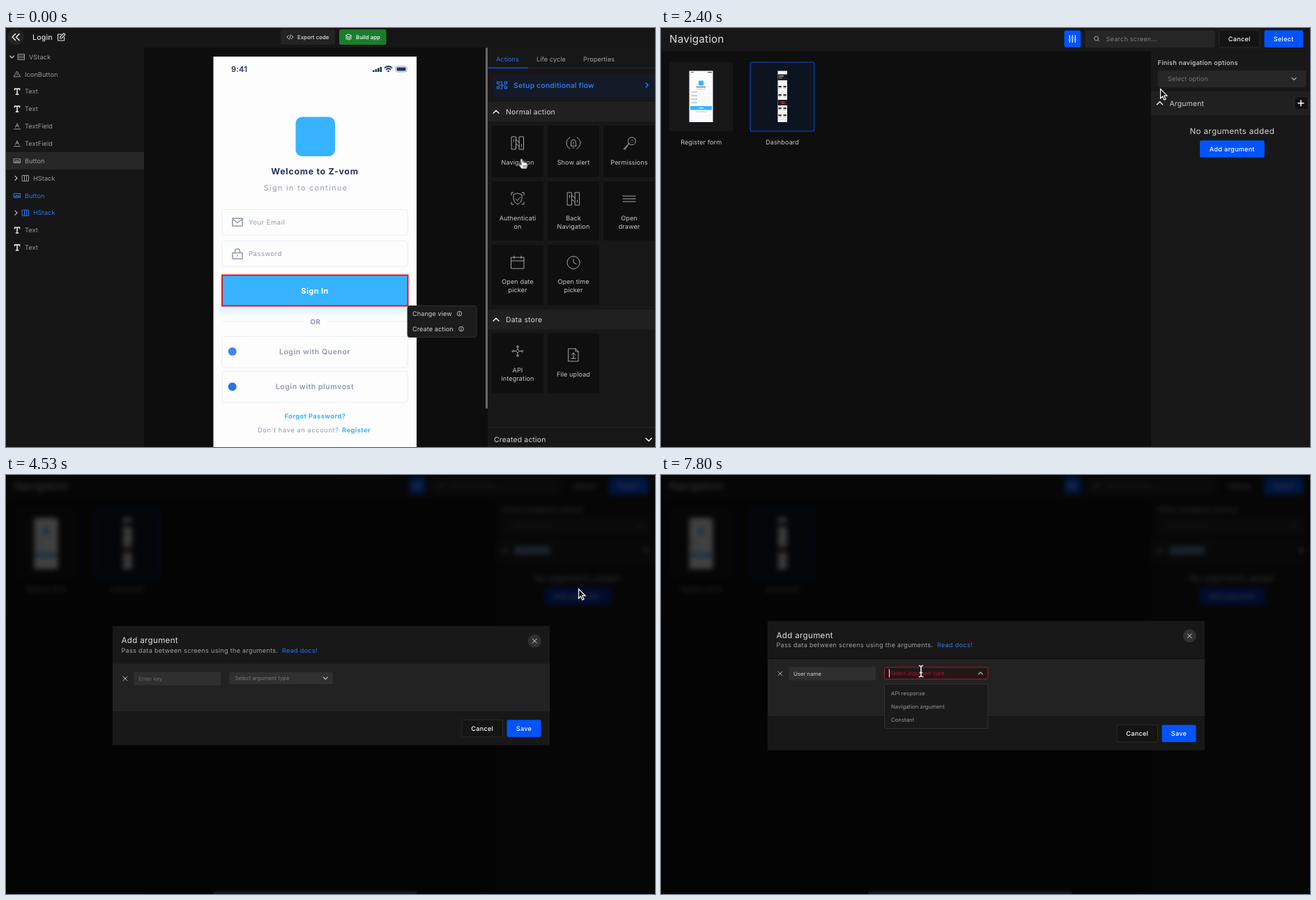
These frames come from a looping animation (931x601 px, 8 s). An HTML page:

```html
<!DOCTYPE html>
<html lang="en">
<head>
<meta charset="utf-8">
<title>Navigation action</title>
<style>
html,body{margin:0;width:100%;height:100%;overflow:hidden;background:#0d0d0d}
svg{display:block;width:931px;height:601px}
text{font-family:Inter,sans-serif;white-space:pre;text-rendering:geometricPrecision}
.line{fill:none;stroke-linecap:round;stroke-linejoin:round}

/* 8 s loop: 1% = 80 ms. Elements with .s start hidden and switch hard. */
.s{opacity:0;animation:8s step-end infinite}
#nav{opacity:0;animation:8s step-end infinite nav,8s linear infinite blur}
#regOn{animation-name:regOn}
#dashOn{animation-name:dashOn}
#searchOn{animation-name:searchOn}
#searchCaret{animation-name:searchCaret}
#mark{animation-name:mark}
#addHover{animation-name:addHover}
#dim{opacity:0;animation:8s linear infinite dim}
#dialog{opacity:0;transform-origin:466px 302px;animation:8s linear infinite dialog}
#top{animation:8s step-end infinite up}
#bottom{animation:8s step-end infinite down}
#keyOn{animation-name:keyOn}
#invalid{animation-name:invalid}
#menu,#arrowUp{animation-name:menu}
#arrowDown{opacity:1;animation:8s step-end infinite arrowDown}
#cursor{animation:8s ease-in-out infinite move}
#arrow{animation-name:arrow}
#hand{animation-name:hand}
#beam{animation-name:beam}

@keyframes nav{.875%{opacity:1}}
@keyframes blur{0%,53.375%{filter:none}56.625%,100%{filter:blur(3.5px)}}
@keyframes regOn{0%{opacity:1}17.5%{opacity:0}}
@keyframes dashOn{15.875%{opacity:1}}
@keyframes searchOn{0%{opacity:1}15.875%{opacity:0}}
@keyframes searchCaret{0%{opacity:1}7.125%{opacity:0}13.375%{opacity:1}15.875%{opacity:0}}
@keyframes mark{35%{opacity:1}}
@keyframes addHover{48.375%{opacity:1}}
@keyframes dim{0%,53.375%{opacity:0}56.625%,100%{opacity:1}}
@keyframes dialog{0%,53.375%{opacity:0;transform:scale(.95)}56.625%,100%{opacity:1;transform:none}}
@keyframes up{72.5%{transform:translateY(-7.2px)}}
@keyframes down{72.5%{transform:translateY(7.3px)}}
@keyframes keyOn{65.875%{opacity:1}95.875%{opacity:0}}
@keyframes invalid{72.5%{opacity:1}}
@keyframes menu{95.875%{opacity:1}}
@keyframes arrowDown{95.875%{opacity:0}}
@keyframes arrow{.875%{opacity:1}15%{opacity:0}21%{opacity:1}48.375%{opacity:0}54.2%{opacity:1}64.5%{opacity:0}}
@keyframes hand{0%{opacity:1}.875%{opacity:0}15%{opacity:1}21%{opacity:0}48.375%{opacity:1}54.2%{opacity:0}}
@keyframes beam{64.5%{opacity:1}72.5%{opacity:0}92.5%{opacity:1}}
@keyframes move{
  0%,6.2%{transform:translate(739.5px,187.5px)}
  15.875%,19.2%{transform:translate(205px,99.5px)}
  30%,30.5%{transform:translate(716px,87px)}
  38.4%,42%{transform:translate(783px,110px)}
  50%,57%{transform:translate(821px,163px)}
  65.5%,72.5%{transform:translate(291px,294px)}
  72.6%,92%{transform:translate(340px,285px)}
  95.3%,100%{transform:translate(373px,281.5px)}
}
</style>
</head>
<body>
<svg id="stage" viewBox="0 0 931 601" xmlns="http://www.w3.org/2000/svg"></svg>
<script>
const text = (x, y, str, fill = '#b4b4b4', o = {}) =>
  `<text x="${x}" y="${y}" fill="${fill}" font-size="${o.size || 9.05}" font-weight="${o.weight || 400}"` +
  ` letter-spacing="${o.gap ?? .12}" text-anchor="${o.mid ? 'middle' : 'start'}">${str}</text>`;
const mid = (x, y, str, fill, o) => text(x, y, str, fill, { ...o, mid: 1 });
const box = (x, y, x2, y2, fill, r = 0, stroke = 'none', w = 1) =>
  `<rect x="${x}" y="${y}" width="${x2 - x}" height="${y2 - y}" rx="${r}" fill="${fill}" stroke="${stroke}" stroke-width="${w}"/>`;
const dot = (x, y, r, fill, stroke = 'none') =>
  `<circle cx="${x}" cy="${y}" r="${r}" fill="${fill}" stroke="${stroke}"/>`;
const line = (d, color, w = 1, x = 0, y = 0) =>
  `<path class="line" d="${d}" stroke="${color}" stroke-width="${w}" transform="translate(${x} ${y})"/>`;
const group = (id, body, cls = '') => `<g id="${id}" class="${cls}">${body}</g>`;

const BLUE = '#0054ff', LINK = '#2f74f5', SKY = '#37b3ff', NAVY = '#223263', SLATE = '#9098b1';
const DOWN = 'M-3-1.5L0 1.5L3-1.5', UP = 'M-3 1.5L0-1.5L3 1.5', RIGHT = 'M-1.5-3L1.5 0L-1.5 3';
const BIG_UP = 'M-4 2L0-2L4 2', CROSS = 'M-3-3L3 3M3-3L-3 3';

const icons = {
  vstack: 'M-4.5-4h9v8h-9ZM-4.5-1.3h9M-4.5 1.3h9',
  hstack: 'M-4.5-4h9v8h-9ZM-1.5-4v8M1.5-4v8',
  shape: 'M0-4L4.5 3.5H-4.5ZM0-1v2',
  type: 'M-3.5-2.5V-4H3.5V-2.5M0-4V4M-1.5 4H1.5',
  field: 'M-2.5 1.5L0-4L2.5 1.5M-1.6-.5H1.6M-4.5 4H4.5',
  button: 'M-4.5-2.8h9v5.6h-9ZM-2.5 0h5M-4 1.5h8',
  route: 'M-8.5-9h6v18h-6ZM2.5-9h6v18h-6ZM-2.5-5L2.5-1M-2.5 1L2.5 5M-5.5-5v3M5.5 2v3',
  alert: 'M-3.5 4V-1Q-3.5-5 0-5T3.5-1V4ZM-1 7H1M0-2v3M-5 8A9 9 0 0 1-5-8M5 8A9 9 0 0 0 5-8',
  key: 'M-.5 1L-8 8.5H-5V6H-3V4L-.5 2M-1 0A5.5 5.5 0 1 1 2 2.5ZM4-4.5h.5',
  shield: 'M0-8L6-6V0Q6 5 0 8Q-6 5-6 0V-6ZM-3 0L-.5 2.5L3.5-2M-9-5V-9H-6M9-5V-9H6M-9 5V8H-6M9 5V8H6',
  drawer: 'M-9-4H9M-9 0H9M-9 4H9',
  date: 'M-9-7H9V9H-9ZM-9-2H9M-5-9V-5M5-9V-5',
  time: 'M9 0A9 9 0 1 1-9 0A9 9 0 1 1 9 0M0-5V0L4 2',
  api: 'M0-2.5L2.5 0L0 2.5L-2.5 0ZM0-5V-2.5M0 2.5V5M-5 0H-2.5M2.5 0H5M-1.3-6.5a1.3 1.3 0 1 0 2.6 0a1.3 1.3 0 1 0-2.6 0M-1.3 6.5a1.3 1.3 0 1 0 2.6 0a1.3 1.3 0 1 0-2.6 0M-7.8 0a1.3 1.3 0 1 0 2.6 0a1.3 1.3 0 1 0-2.6 0M5.2 0a1.3 1.3 0 1 0 2.6 0a1.3 1.3 0 1 0-2.6 0',
  upload: 'M-7-9H3L7-5V9H-7ZM3-9V-5H7M0 5V-3M-3 0L0-3L3 0M-3.5 5H3.5'
};
const icon = (name, x, y, color, w = 1) => line(icons[name], color, w, x, y);

function tree() {
  const rows = [['vstack', 'VStack', 6, 1], ['shape', 'IconButton'], ['type', 'Text'], ['type', 'Text'],
    ['field', 'TextField'], ['field', 'TextField'], ['button', 'Button'], ['hstack', 'HStack', 12],
    ['button', 'Button', 0, 0, 1], ['hstack', 'HStack', 12, 0, 1], ['type', 'Text'], ['type', 'Text']];
  return box(0, 28, 198, 601, '#161616') + box(0, 178, 198, 203, '#272727') +
    rows.map(([ic, label, dx = 0, open, linked], i) => {
      const y = 41.5 + i * 24.85, color = linked ? LINK : '#9c9c9c';
      return (dx ? line(open ? DOWN : RIGHT, '#ccc', 1.2, open ? 8.5 : 14.5, y) : '') +
        icon(ic, 16 + dx, y, linked ? LINK : ic === 'type' ? '#ddd' : '#999', ic === 'type' ? 1.7 : 1) +
        text(27 + dx, y + 3.2, label, color);
    }).join('');
}

function phone() {
  const bold = { weight: 700 }, body = { size: 9.5, gap: .5 };
  const field = (y, y2) => box(310, y, 576, y2, '#fdfdfe', 3, '#e9edf6');
  const login = { size: 10.5, weight: 600, gap: .55 };
  return box(297.5, 41, 589, 601, '#fdfdfd') +
    text(323, 62.5, '9:41', NAVY, { size: 11.2, weight: 600 }) +
    [0, 1, 2, 3].map(i => box(526 + i * 3.5, 60.5 - i * 1.6, 528.6 + i * 3.5, 63, NAVY, .6)).join('') +
    line('M-5-2Q0-6 5-2M-3 .5Q0-2 3 .5', NAVY, 1.7, 548.5, 59) + dot(548.5, 62, 1.3, NAVY) +
    box(559, 55, 575, 63, '#fff', 2.5, '#9aa3bb') + box(560.5, 56.5, 573.5, 61.5, NAVY, 1) +
    box(415.5, 127.5, 472, 184, SKY, 9) +
    mid(443, 210, 'Welcome to Z-vom', NAVY, { size: 12.4, weight: 700, gap: .7 }) +
    mid(429.5, 233, 'Sign in to continue', SLATE, { size: 10.6, gap: 1.45 }).replace('429.5', '430') +
    field(260.5, 297) + field(305.5, 342) +
    line('M-7-5.5H7V5.5H-7ZM-7-4.5L0 1L7-4.5', SLATE, 1.5, 332, 278.5) +
    line('M-7-1.5H7V7H-7ZM-3.5-1.5V-4Q-3.5-7 0-7T3.5-4V-1.5M0 2v1', SLATE, 1.5, 332, 324) +
    text(348, 282, 'Your Email', SLATE, body) + text(348, 327, 'Password', SLATE, body) +
    '<defs><linearGradient id="glow" x2="0" y2="1"><stop stop-color="#d3edff"/><stop offset="1" stop-color="#fdfdfd"/></linearGradient></defs>' +
    box(306, 398, 580, 414, 'url(#glow)', 4) + box(310, 354.5, 576.5, 398.5, SKY, 0, '#e3161d', 2) +
    mid(443, 380.5, 'Sign In', '#fff', { size: 11, weight: 700, gap: .4 }) +
    line('M310 421H427M460 421H576', '#edf0f7') + mid(443.7, 425, 'OR', SLATE, { size: 10, weight: 700, gap: .3 }) +
    field(442.5, 487) + field(492.5, 537) + dot(324.7, 464, 6, '#4285f4') + dot(324.7, 514.5, 6, '#2f72e6') +
    mid(443, 468, 'Login with Quenor', SLATE, login) + mid(443, 518.3, 'Login with plumvost', SLATE, login) +
    mid(443.5, 560, 'Forgot Password?', SKY, { size: 9.2, gap: .45, ...bold }) +
    text(361, 579.7, "Don't have an account?", SLATE, { size: 9.2, gap: .65 }) +
    text(482, 579.7, 'Register', SKY, { size: 9.2, gap: .5, ...bold });
}

function actions() {
  const head = { size: 10.35, gap: .2 };
  const section = (y, label) => box(692, y, 931, y + 28.5, '#202020') + line(BIG_UP, '#eee', 1.5, 703, y + 14.2) +
    text(717, y + 18, label, '#d6d6d6', head);
  const card = (col, y, y2, ic, iy, labels, ly) => {
    const x = 697 + col * 80;
    return box(x, y, x + 74, y2, '#0f0f0f', 2) + icon(ic, x + 37, iy, '#b5b5b5', .9) +
      labels.map((s, i) => mid(x + 37, ly + i * 12, s, '#c8c8c8')).join('');
  };
  return box(688, 28, 691, 546, '#686868', 1.5) + box(691, 28, 931, 601, '#171717') +
    text(703, 47.5, 'Actions', LINK) + text(761, 47.5, 'Life cycle', '#a2a2a2') + text(828, 47.5, 'Properties', '#a2a2a2') +
    line('M692 57.5H931', '#292929') + line('M692 57.3H748', BLUE, 1.5) +
    box(698, 67, 931, 99, '#141a27', 2) + line(RIGHT, LINK, 1.5, 919.5, 82) +
    line('M-5 0H5M-2-5H0V5H-2M-7-5h3v3h-3ZM-7 2h3v3h-3ZM4-5h3v3H4ZM4 2h3v3H4Z', LINK, 1.2, 711.5, 82) +
    text(728, 86, 'Setup conditional flow', LINK, { ...head, weight: 600 }) +
    section(106, 'Normal action') +
    card(0, 140, 214, 'route', 165, ['Navigation'], 195.5) + card(1, 140, 214, 'alert', 165, ['Show alert'], 195.5) +
    card(2, 140, 214, 'key', 165, ['Permissions'], 195.5) +
    card(0, 220, 305, 'shield', 245, ['Authenticati', 'on'], 275.7) + card(1, 220, 305, 'route', 245, ['Back', 'Navigation'], 275.7) +
    card(2, 220, 305, 'drawer', 245, ['Open', 'drawer'], 275.7) +
    card(0, 311, 397, 'date', 336, ['Open date', 'picker'], 367.3) + card(1, 311, 397, 'time', 336.5, ['Open time', 'picker'], 367.3) +
    section(404, 'Data store') +
    card(0, 438, 523.5, 'api', 463.5, ['API', 'integration'], 494) + card(1, 438, 523.5, 'upload', 469, ['File upload'], 500) +
    line('M692 573H931', '#262626') + text(700, 594, 'Created action', '#d6d6d6', head) + line('M-4-2L0 2L4-2', '#eee', 1.7, 922, 590.5);
}

function editor() {
  const small = { size: 7.76, weight: 500, gap: .05 };
  const info = (x, y) => dot(x, y, 3.3, 'none', '#bbb') + line('M0-1.5v0M0 0v1.5', '#ddd', 1, x, y);
  return box(0, 0, 931, 601, '#0d0d0d') + box(0, 0, 931, 28, '#161616') +
    dot(14, 13, 11.5, '#242424') + line('M-.5-4.5L-5 0L-.5 4.5M5-4.5L.5 0L5 4.5', '#fff', 1.4, 14, 13) +
    text(38, 17, 'Login', '#e4e4e4', { size: 10.5, weight: 500, gap: .2 }) +
    line('M0-4H-5V5H4V0M-2 2V0L3.5-5.5L5.5-3.5L0 2Z', '#ddd', 1.1, 79.5, 13) +
    box(394, 2, 472, 24, '#232323', 2) + line('M-2-2.5L-4.5 0L-2 2.5M2-2.5L4.5 0L2 2.5M.7-3L-.7 3', '#ddd', .9, 407.5, 13) +
    text(418, 15.8, 'Export code', '#e0e0e0', small) + box(478, 2, 545.5, 24, '#1b7d2c', 2) +
    line('M0-4L4-2L0 0L-4-2ZM-4 0L0 2L4 0M-4 2L0 4L4 2', '#fff', .9, 491.5, 13) + text(502, 15.8, 'Build app', '#fff', small) +
    tree() + phone() + actions() +
    box(576, 398.5, 675, 443.5, '#1c1c1c', 3, '#303030') +
    text(583, 412.7, 'Change view', '#d0d0d0') + info(650.5, 409.7) +
    text(583, 434.7, 'Create action', '#d0d0d0') + info(653, 431.7);
}

function thumbs() {
  const form = box(40.5, 61.5, 74.5, 135, '#fbfcfe') + box(43, 63, 47, 64, '#667') + box(67, 63, 73, 64.2, '#445') +
    box(54, 75.5, 61, 82.5, SKY, 1.2) + box(50.5, 84, 64, 85.2, '#556288') + box(51, 87, 64, 87.8, '#bbc1d1') +
    [92, 97, 102, 107].map(y => box(42.5, y - 1.7, 72.5, y + 1.7, '#fff', .5, '#eceff6', .5) + box(43.5, y - .6, 52, y + .6, '#a9b0c4')).join('') +
    box(42, 112, 73, 117.5, SKY, .5) + box(54, 114.2, 61, 115.2, '#fff') + box(50, 119.7, 65, 120.6, '#b7bed0') +
    box(42, 125, 73, 125.5, '#eef1f6');
  const shop = box(167.5, 61.5, 181, 135, '#f3f3f5') + box(167.5, 66.5, 181, 75, '#191920') + box(168.5, 68.5, 176, 69.5, '#ddd') +
    box(168.5, 71, 174, 72, '#999') + [84, 96, 115, 125].map(y => [170.8, 177.8].map(x =>
      box(x - 2.3, y - 1, x + 2, y + 1.2, '#33343c', .6) + box(x - 2.3, y + 2.5, x + 1, y + 3.1, '#aaa')).join('')).join('') +
    box(167.5, 103, 181, 111, '#2b161a') + box(172, 105, 178, 109, '#8f2830', 2) + box(168.5, 130.5, 180, 131.2, '#bbb');
  const card = (x, id) => box(x, 49, x + 91.5, 148, '#171717', 2) +
    group(id, box(x, 49, x + 91.5, 148, '#0c1420', 2, '#0a48dc', 1.1), 's');
  return card(12, 'regOn') + form + card(128.2, 'dashOn') + shop +
    mid(57.7, 166.5, 'Register form', '#c8c8c8') + mid(174, 166.5, 'Dashboard', '#c8c8c8');
}

const strong = { weight: 500, gap: .3 };
const action = (x, y, x2, label, primary) =>
  box(x, y, x2, y + 24.5, primary ? BLUE : '#141414', 2, primary ? 'none' : '#303030', .8) +
  mid((x + x2) / 2, y + 15.5, label, '#fff', strong);

function nav() {
  return box(0, 0, 931, 601, '#0e0e0e') + box(0, 0, 931, 33.5, '#181818') +
    text(12, 21, 'Navigation', '#dedede', { size: 15.2, gap: .2 }) +
    box(578.5, 3.5, 602, 27.5, BLUE, 2) +
    line('M-4-5V0M-4 3V5M0-5V-3M0 0V5M4-5V0M4 3V5M-5.3 1.5h2.6M-1.3-1.5h2.6M2.7 1.5h2.6', '#fff', 1.2, 590.2, 15.5) +
    box(608.5, 3.5, 794.5, 28, '#262626', 2) +
    group('searchOn', box(608.5, 3.5, 794.5, 28, '#161b29', 2, '#1746c4'), 's') +
    line('M3 0A3 3 0 1 1-3 0A3 3 0 1 1 3 0M2.2 2.2L4 4', '#aaa', 1, 624.5, 15) +
    text(638.5, 19, 'Search screen...', '#7c7c7c', { gap: .25 }) +
    group('searchCaret', line('M639 10V21', '#eee'), 's') +
    action(800.5, 3.3, 859, 'Cancel') + action(865.5, 3.3, 921, 'Select', 1) + thumbs() +
    box(703, 34, 931, 601, '#181818') +
    text(712.5, 53, 'Finish navigation options', '#d4d4d4', strong) +
    box(712.5, 61, 925, 85, '#262626', 2) + text(727, 76.3, 'Select option', '#737373') + line(DOWN, '#aaa', 1.2, 908, 73) +
    box(703, 91, 931, 125, '#202020') + line(BIG_UP, '#eee', 1.5, 715.5, 107.7) +
    group('mark', box(729.5, 101, 780, 114.8, '#4b6a97'), 's') +
    text(729.5, 111.5, 'Argument', '#cfcfcf', { size: 10.35, gap: .22 }) +
    box(909, 98.5, 928, 117, '#121212', 2, '#2c2c2c', .8) + line('M-4 0H4M0-4V4', '#fff', 1.5, 918, 107.7) +
    mid(819.3, 152.3, 'No arguments added', '#d2d2d2', { size: 11.64, gap: .36 }) +
    box(773, 161.3, 865.7, 185.7, BLUE, 2) + group('addHover', box(773, 161.3, 865.7, 185.7, '#0130b4', 2), 's') +
    mid(819.3, 176.8, 'Add argument', '#fff', strong);
}

function dialog() {
  const small = { size: 7.76, gap: .03 };
  const head = box(153, 216.5, 780, 270.5, '#181818') +
    text(165.5, 241, 'Add argument', '#dedede', { size: 11.64, gap: .3 }) +
    text(165.5, 254.7, 'Pass data between screens using the arguments.', '#a0a0a0', { gap: .32 }) +
    text(396, 254.7, 'Read docs!', LINK, { gap: .32 }) +
    dot(758.3, 238, 9.5, '#303030') + line(CROSS, '#ddd', 1, 758.3, 238) + line(CROSS, '#b5b5b5', 1, 171, 292);
  const key = box(183.5, 282.5, 308, 301.7, '#2f2f2f', 2) +
    group('keyOn', box(183.5, 282.5, 308, 301.7, '#161c2b', 2, '#1048d6') +
      '<path id="caret" d="M0 287V297" stroke="#eee" stroke-width="1"/>', 's') +
    group('hint', text(190.5, 295, 'Enter key', '#666b75', { ...small, size: 7.6 })) +
    group('typed', text(190, 295, '', '#d0d0d0', small));
  const kind = color => text(328.5, 294.2, 'Select argument type', color, { ...small, size: 7.65 });
  const pick = box(320.5, 283, 469, 300, '#303030', 2) + kind('#7a7a7a') +
    group('invalid', box(320.5, 283, 469, 300, '#211719', 2, '#b5152f') + kind('#a3182e'), 's') +
    group('arrowDown', line(DOWN, '#bbb', 1.1, 458.3, 291.5)) +
    group('arrowUp', line(UP, '#bbb', 1.1, 458.3, 291.5) + line('M327.5 286V297', '#eee'), 's');
  const foot = box(153, 339, 780, 387.5, '#181818') + action(654, 351.2, 712.5, 'Cancel') + action(718.5, 351.2, 767.5, 'Save', 1);
  const menu = box(320.5, 300, 469, 363.5, '#1a1a1a', 2, '#323232') +
    ['API response', 'Navigation argument', 'Constant'].map((s, i) => text(330, 315.6 + i * 19.2, s, '#969696', small)).join('');
  return box(153, 264, 780, 346, '#222') + group('top', head + key + pick) + group('bottom', foot) + group('menu', menu, 's');
}

function cursor() {
  const bar = 'M-3-8Q0-8 0-6Q0-8 3-8M0-6V6M-3 8Q0 8 0 6Q0 8 3 8M-2 2H2';
  return group('arrow', '<path d="M0 0V14.3L3.4 11.2L5.7 16.4L8-15.4+30.8L0 0Z" display="none"/>' +
      '<path d="M.5 .5V14L3.6 11L5.8 16.3L8 15.3L5.8 10.2H10Z" fill="#111" stroke="#fff" stroke-width="1.2"/>', 's')
      .replace(/<path[^>]*display="none"\/>/, '') +
    group('hand', '<path d="M-1.6 1.6Q-1.4-.2 0-.1T1.6 1.4L2.2 5Q3.8 4.2 4.6 5.4Q6.2 4.8 6.8 6.2Q8.8 6 8.9 8L8.6 11L7.2 14.5H.2L-3.4 10Q-4.6 8.2-3.2 7.8Q-2 7.6-.2 9.2Z" fill="#fff" stroke="#111" stroke-width=".8"/>' +
      line('M2.8 9.5V12.5M4.6 9.3V12.3M6.4 9V12', '#222', .7), 's') +
    group('beam', line(bar, '#000', 3.4) + line(bar, '#fff', 1.6), 's');
}

const byId = id => document.getElementById(id);
byId('stage').innerHTML = editor() + group('nav', nav()) + group('dim', box(0, 0, 931, 601, 'rgba(0,0,0,.74)')) +
  group('dialog', dialog()) + group('cursor', cursor());

// Typing follows the clock of the CSS loop.
const word = 'User name', strokes = [5800, 6070, 6470, 6530, 6670, 6870, 7000, 7070, 7200];
const typed = byId('typed').firstChild;
const clock = byId('cursor').getAnimations()[0];
function tick() {
  const now = (clock.currentTime || 0) % 8000;
  typed.textContent = word.slice(0, strokes.filter(t => t <= now).length);
  byId('hint').style.opacity = typed.textContent ? 0 : 1;
  const x = 190.8 + (typed.textContent ? typed.getComputedTextLength() : 0);
  byId('caret').setAttribute('transform', `translate(${x} 0)`);
  requestAnimationFrame(tick);
}
tick();
</script>
</body>
</html>
```
